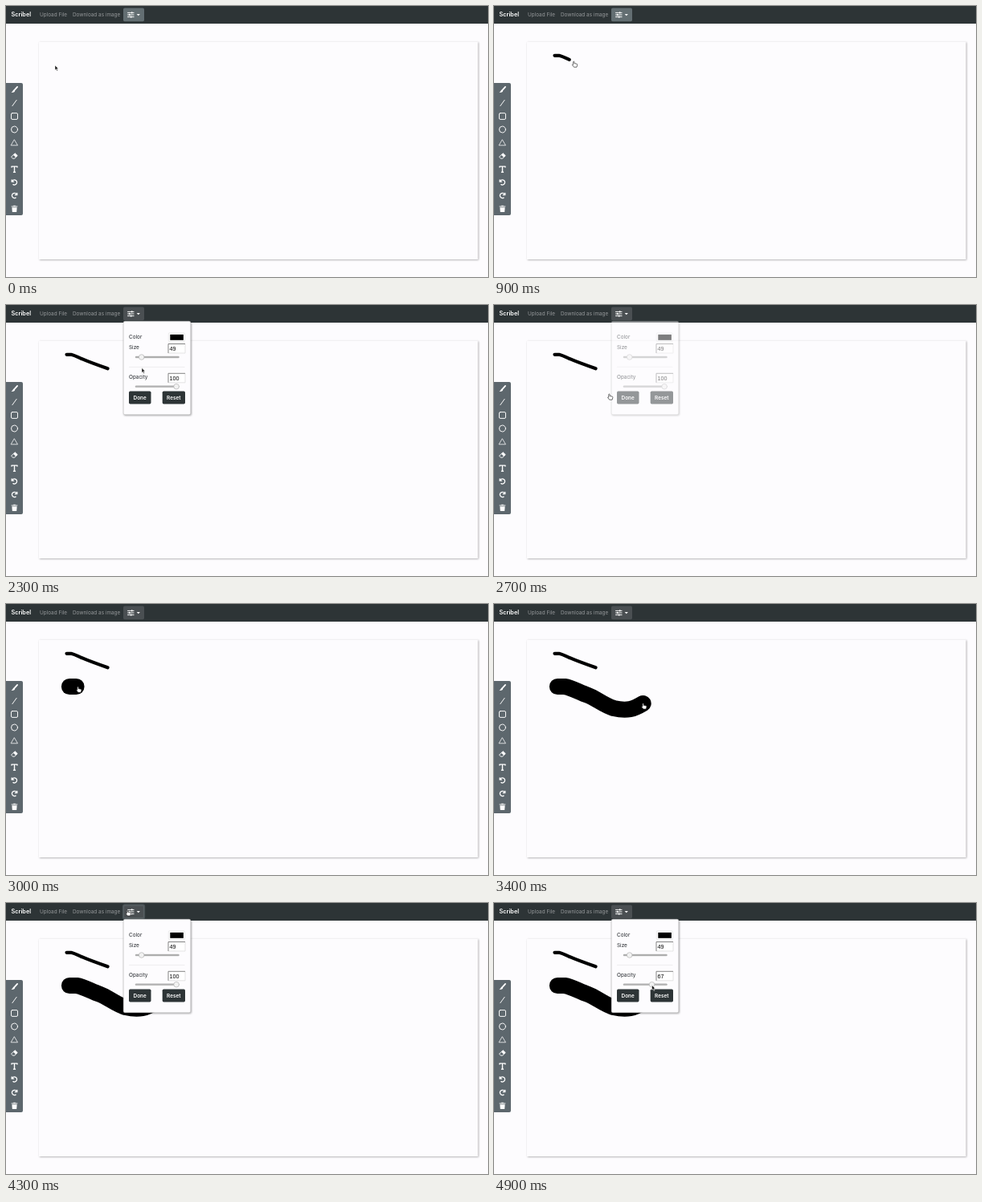
These frames come from a looping animation (600x338 px, 5000 ms). An HTML page:

```html
<!DOCTYPE html>
<html lang="en">
<head>
<meta charset="utf-8">
<title>Paint app</title>
<style>
  html, body { margin: 0; width: 100%; height: 100%; overflow: hidden; background: #fdfcfe; }
  svg { display: block; width: 600px; height: 338px; font: 6.4px Inter, sans-serif; }
  .icon { fill: none; stroke: #fff; stroke-width: .95; stroke-linecap: round; stroke-linejoin: round; }
  .solid { fill: #fff; stroke: none; }
  .ink { fill: none; stroke: #000; stroke-linecap: round; stroke-linejoin: round; }
  .num { font: 7.2px "Liberation Sans", Arial, sans-serif; }
  .btn { fill: #2d3436; }
  .btn-text { fill: #fff; font-weight: 600; text-anchor: middle; }
  .track { fill: #b4b4b4; stroke: #999; stroke-width: .4; }
  .thumb { fill: #f2f2f2; stroke: #aaa; stroke-width: .6; }
</style>
</head>
<body>
<svg viewBox="0 0 600 338">
  <defs>
    <filter id="soft" x="-10%" y="-10%" width="120%" height="120%"><feGaussianBlur stdDeviation="1.2"/></filter>
    <g id="field">
      <rect width="21" height="11.5" fill="#fff"/>
      <path d="M21 0V11.5H0" fill="none" stroke="#ddd" stroke-width=".8"/>
      <path d="M0 11.5V0H21" fill="none" stroke="#777" stroke-width=".9"/>
    </g>
    <rect id="track" class="track" x="161" y="-.9" width="54.5" height="1.8" rx=".9"/>
  </defs>

  <rect x="41.8" y="45.3" width="546.5" height="271.5" opacity=".32" filter="url(#soft)"/>
  <rect x="41" y="44.5" width="546.5" height="271.5" fill="#fdfcfe"/>

  <path id="thin" class="ink" pathLength="1" stroke-width="4.2" d="M75.5 61.8H81C85 62.6 90 65.4 94.5 67.2Q104 71.4 126.6 79.3"/>
  <path id="thick" class="ink" pathLength="1" stroke-width="20.2" d="M79 103H88C97 104.5 106 110 116 113.5C128 118 136 126 149 130C166 134 174 131 185.6 124"/>

  <rect width="600" height="22" fill="#2d3436"/>
  <text x="6.5" y="13.4" font-size="7.3" font-weight="600" fill="#fff">Scribel</text>
  <g fill="#96999b">
    <text x="42" y="13.2">Upload File</text>
    <text x="83" y="13.2">Download as image</text>
  </g>
  <rect id="menu" x="146" y="2.5" width="26" height="16.7" rx="1.8" stroke="#636e72" stroke-opacity=".5"/>
  <g class="icon" transform="translate(151.5 11)">
    <path d="M0-2.6H7.6M0 0H7.6M0 2.6H7.6"/>
    <path d="M5.2-3v.8M2.2-.4v.8M4.2 2.2v.8" stroke-width="1.6"/>
    <path class="solid" d="M11.2-1.1h4.2l-2.1 2.3z"/>
  </g>

  <path d="M0 96H19a2 2 0 0 1 2 2V259a2 2 0 0 1-2 2H0z" fill="#5d676d"/>
  <rect id="brush" y="96" width="21" height="16.5" fill="#2d3436"/>
  <g class="icon" id="tools"></g>

  <g id="panel">
    <rect x="146.5" y="21.5" width="84.5" height="116.5" rx="2" opacity=".33" filter="url(#soft)"/>
    <rect x="146.2" y="20.3" width="83.6" height="116.4" rx="1.8" fill="#fdfcfe" stroke="#bbb" stroke-width=".5"/>
    <g fill="#212529">
      <text x="153" y="41.6">Color</text>
      <text x="153" y="55.2">Size</text>
      <text x="153" y="92.2">Opacity</text>
    </g>
    <rect x="202.3" y="34.8" width="20" height="10.6" rx="1" fill="#fff" stroke="#ddd" stroke-width=".6"/>
    <rect x="204.3" y="36.8" width="16.6" height="7"/>
    <use href="#field" x="202" y="48.5"/>
    <use href="#field" x="202" y="85.3"/>
    <text id="sizeText" class="num" x="203.6" y="56.9"/>
    <text id="alphaText" class="num" x="203.6" y="93.7"/>
    <use href="#track" y="65"/>
    <use href="#track" y="101.7"/>
    <circle id="sizeThumb" class="thumb" cy="65" r="3.3"/>
    <circle id="alphaThumb" class="thumb" cy="101.7" r="3.3"/>
    <path d="M153 77.4H222.5" stroke="#e4e4e6" stroke-width=".6"/>
    <rect class="btn" x="153" y="107.6" width="27.5" height="15.8" rx="1.7"/>
    <rect class="btn" x="194.7" y="107.6" width="28.3" height="15.8" rx="1.7"/>
    <text class="btn-text" x="166.7" y="117.9">Done</text>
    <text class="btn-text" x="208.8" y="117.9">Reset</text>
  </g>

  <g id="cursor" stroke-linejoin="round">
    <path id="arrow" d="M0 0V5.9L1.4 4.7L2.4 7L3.4 6.6L2.4 4.3H4.2z" fill="#111" stroke="#fff" stroke-width=".5"/>
    <path id="hand" d="M-.7 .3Q0-.5 .7 .3V2.3L3.8 3Q4.6 3.2 4.4 4.3L3.7 7H.2L-1.9 4.2Q-1.7 3.2-.7 4z" fill="#fff" stroke="#222" stroke-width=".65"/>
  </g>
</svg>
<script>
const $ = id => document.getElementById(id);
const set = (id, attrs) => { for (const k in attrs) $(id).setAttribute(k, attrs[k]); };
const show = (id, on) => set(id, { visibility: on ? 'visible' : 'hidden' });

// Toolbar icons, each centred on its own cell
const undo = '<path d="M-3.3-3.2V-.8H-.9M-3-1A3.1 3.1 0 1 1-1.6 2.6" stroke-width="1.3"/>';
const icons = [
  '<path d="M3.6-3.6L-.2 .6" stroke-width="1.8"/><path class="solid" d="M-1.2 0L.7 1.8Q0 3.8-4 3.5Q-2.6 2.6-1.2 0z"/>',
  '<path d="M2.6-3.6L-2.6 3.6"/>',
  '<rect x="-4" y="-3.9" width="8" height="7.8" rx="1.4"/>',
  '<circle r="4"/>',
  '<path d="M0-3.5L4 3.3H-4z" stroke-width=".75"/>',
  '<path d="M-3.7 1L.6-3.3L3.7-.4L.2 3.2H-1.6z"/><path class="solid" d="M-1.5-1.2L.6-3.3L3.7-.4L1.6 1.8z"/>',
  '<path d="M-3.5-2.4V-3.4H3.5V-2.4M0-3.4V3.6M-1 3.7H1" stroke-width="1.4"/>',
  undo,
  `<g transform="scale(-1 1)">${undo}</g>`,
  '<path d="M-3.4-3H3.4M-1-3.7H1"/><path class="solid" d="M-3.1-1.8H3.1L2.7 4.1H-2.7z"/>'
];
$('tools').innerHTML = icons.map((d, i) => `<g transform="translate(10.5 ${104.5 + 16.5 * i})">${d}</g>`).join('');

// Time t counts tenths of a second
const ramp = (t, from, to) => Math.min(1, Math.max(0, (t - from) / (to - from)));
const smooth = (t, from, to) => { const p = ramp(t, from, to); return p * p * (3 - 2 * p); };

const thinInk = t => ramp(t, 7, 11) ** 1.5;
const thickInk = t => smooth(t, 29.2, 34);

function drawInk(id, k) {
  show(id, k > 0);
  set(id, { 'stroke-dasharray': `${k} 2` });
}

function inkTip(id, k) {
  const { x, y } = $(id).getPointAtLength(k * $(id).getTotalLength());
  return [x, y];
}

// The pointer is pulled to one target after another
function pointerAt(t, sizeX, alphaX) {
  let pos = [61, 74];
  const go = (from, to, target) => {
    const k = smooth(t, from, to);
    pos = pos.map((v, i) => v + (target[i] - v) * k);
  };
  go(0, 3, [9, 103]);
  go(4, 6, inkTip('thin', thinInk(t + .4)));
  go(11, 12.5, [156, 9]);
  go(18, 19, [sizeX, 65]);
  go(21, 23, [169, 78.5]);
  go(23, 25, [166, 114]);
  go(26, 29, inkTip('thick', thickInk(t + .1)));
  go(34, 38.5, [151, 9]);
  go(45, 46, [alphaX, 102.5]);
  return pos;
}

function render(t) {
  drawInk('thin', thinInk(t));
  drawInk('thick', thickInk(t));

  const size = 10 + 39 * ramp(t, 18, 21);
  const alpha = 100 - 33 * ramp(t, 46, 49);
  const sizeX = 164 + size * .096;
  const alphaX = 165 + alpha * .471;
  set('sizeThumb', { cx: sizeX });
  set('alphaThumb', { cx: alphaX });
  $('sizeText').textContent = Math.round(size);
  $('alphaText').textContent = Math.round(alpha);

  const open = ramp(t, 14, 16) - ramp(t, 26, 28) + ramp(t, 38.5, 40.5);
  set('panel', { opacity: open });

  const [x, y] = pointerAt(t, sizeX, alphaX);
  const overMenu = x > 145 && x < 173 && y < 20;
  const overControls = open === 1 && y > 20 && y < 106;
  set('menu', { fill: t < 13 ? '#636e72' : '#4a4f52', 'stroke-width': overMenu && open > 0 ? 2.4 : 0 });
  show('brush', x < 21 && y > 96);

  const arrow = t < 3 || overControls;
  show('arrow', arrow);
  show('hand', !arrow);
  set('cursor', { transform: `translate(${x} ${y})` });
}

const start = performance.now();
function loop() {
  render(Math.floor((performance.now() - start) % 5000 / 100));
  requestAnimationFrame(loop);
}
loop();
</script>
</body>
</html>
```
